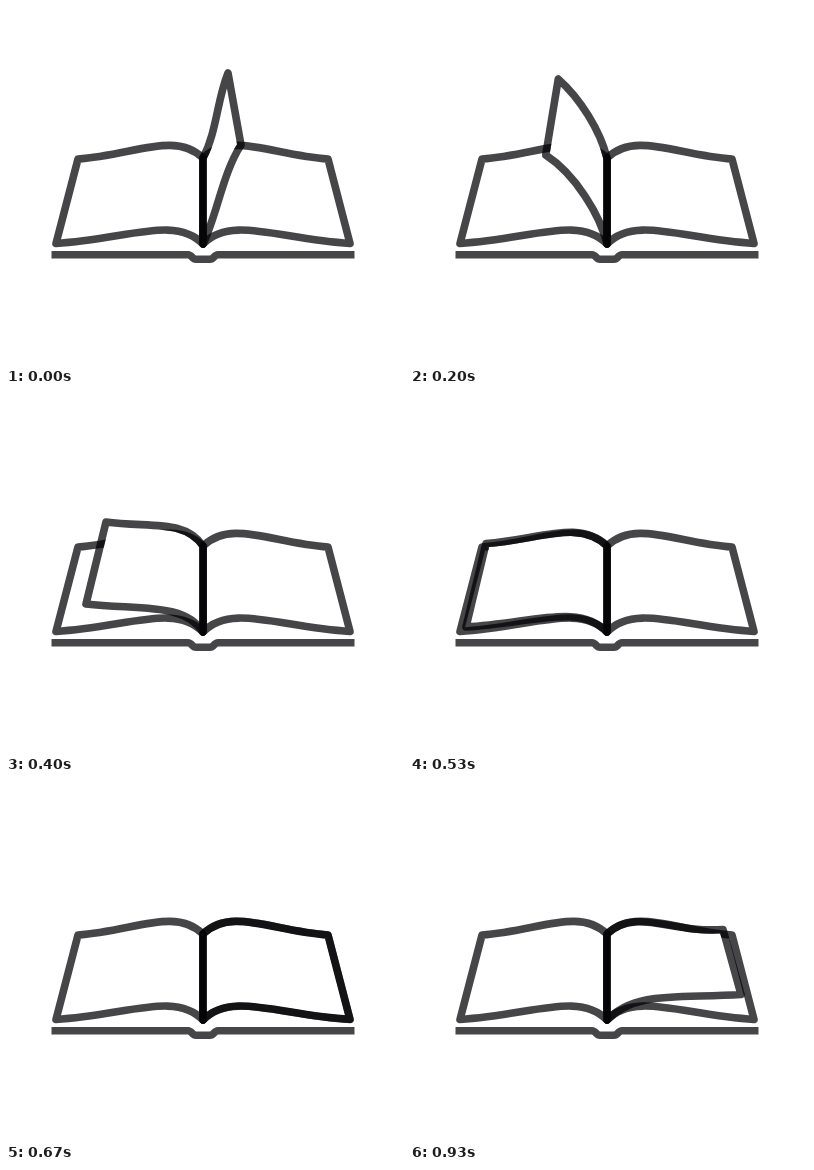
An HTML page with a canvas for the animation above (1000 ms loop, 398x360 px).

```html
<!DOCTYPE html>
<html>
<head>
<meta charset="utf-8">
<style>
html, body { margin: 0; height: 100%; overflow: hidden; background: #fff; }
canvas { display: block; }
</style>
</head>
<body>
<canvas id="stage" width="398" height="360"></canvas>
<script>
const W = 398, H = 360, STEPS = 15, LOOP = 1000;
const SPINE = 197, TOP = 152, BOTTOM = 238;
const INK = 'rgba(0,0,3,.724)';
const ctx = document.getElementById('stage').getContext('2d');
const sheet = document.createElement('canvas');
sheet.width = W;
sheet.height = H;
const layer = sheet.getContext('2d');

// A page: its two outer corners, the curl at its outer end, the lean at the spine.
const page = (tx, ty, bx, by, curl, lean) => [tx, ty, bx, by, curl, lean];
const right = page(322, 153, 344, 237.5, -4, 28);
const left = page(72, 153, 50, 237.5, -4, -28);
const lifted = page(313, 147.5, 331, 212.5, 4, 28);
const turn = [
  lifted,
  page(222, 67, 235, 139, 28, 14),
  page(168, 58, 165, 135, 29, -3),
  page(130, 91, 109, 166, 9, -10),
  page(100, 128, 80, 210, 6, -18),
  page(76, 149.5, 56, 233, -4, -28)
];

function outline([tx, ty, bx, by, curl, lean]) {
  const root = SPINE + lean;
  const path = new Path2D();
  path.moveTo(SPINE, TOP);
  path.bezierCurveTo(root, TOP - 27, tx - (tx - SPINE) * .45, ty + curl, tx, ty);
  path.lineTo(bx, by);
  path.bezierCurveTo(bx - (bx - SPINE) * .48, by + curl, root, BOTTOM - 29, SPINE, BOTTOM);
  path.closePath();
  return path;
}

// The page lifts slowly on the right, then swings over and settles on the left.
function pose(step) {
  if (step > 8) {
    const k = ((step - 9) / 5) ** 3;
    return right.map((v, i) => v + (lifted[i] - v) * k);
  }
  const n = 1 + (step >> 1);
  if (step % 2 === 0) return turn[n];
  const before = turn[n - 1], a = turn[n], b = turn[n + 1], after = turn[n + 2] || b;
  return a.map((v, i) => (17 * (v + b[i]) - before[i] - after[i]) / 32);
}

// White paper inside the outline; ink stays translucent over what lies below.
function drawSheet(path) {
  layer.clearRect(0, 0, W, H);
  layer.fill(path);
  layer.globalCompositeOperation = 'destination-out';
  layer.strokeStyle = '#000';
  layer.stroke(path);
  layer.globalCompositeOperation = 'source-over';
  layer.strokeStyle = INK;
  layer.stroke(path);
  ctx.drawImage(sheet, 0, 0);
}

for (const c of [ctx, layer]) {
  c.lineWidth = 7.6;
  c.lineJoin = 'round';
  c.strokeStyle = INK;
  c.fillStyle = '#fff';
}
const cover = new Path2D('M45.5 248.8H182C186 248.8 186 253.3 190 253.3H204C208 253.3 208 248.8 212 248.8H348.5');
const still = [cover, outline(left), outline(right)];

function frame() {
  const t = (performance.now() - start) % LOOP;
  const step = Math.min(STEPS - 1, Math.floor((t + 3.4) * STEPS / LOOP));
  ctx.fillRect(0, 0, W, H);
  still.forEach(p => ctx.stroke(p));
  drawSheet(outline(pose(step)));
  requestAnimationFrame(frame);
}
const start = performance.now();
frame();
</script>
</body>
</html>
```
